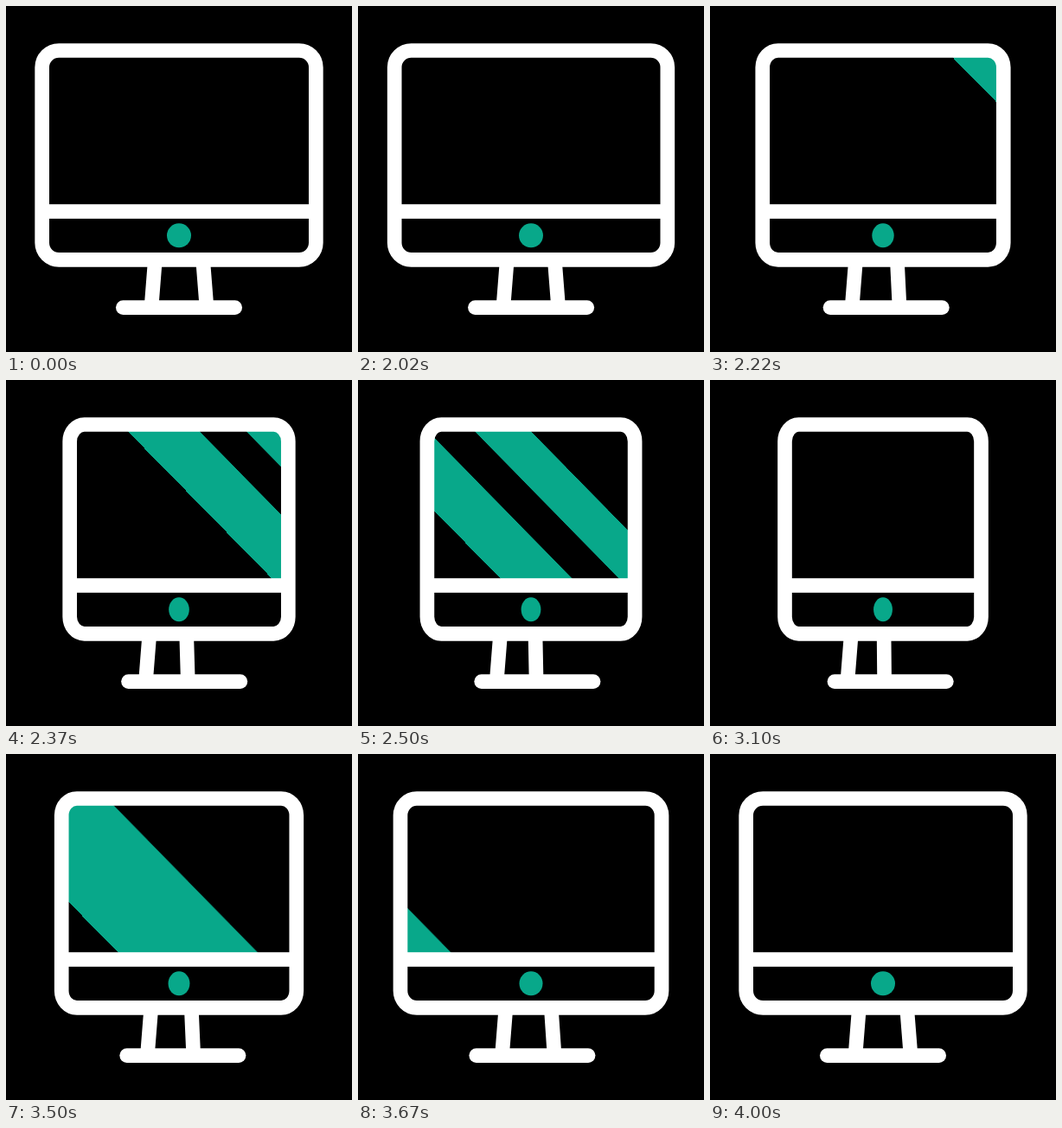
Recreate the animation shown at these times as an HTML page without scripts. Size 400 px wide and 400 px high, loop 4020 ms.

```html
<!DOCTYPE html>
<html lang="en">
<head>
<meta charset="utf-8">
<title>Monitor</title>
<style>
  /* how far each side of the monitor has moved inwards */
  @property --d {
    syntax: "<length>";
    inherits: true;
    initial-value: 0px;
  }
  html, body {
    margin: 0;
    width: 100%;
    height: 100%;
    overflow: hidden;
    background: #000;
  }
  svg {
    display: block;
    width: 100vw;
    height: 100vh;
    animation: squeeze 4020ms infinite;
  }
  .line {
    fill: none;
    stroke: #fff;
    stroke-width: 16.67px;
    stroke-linecap: round;
  }
  .green { fill: #08a88a; }
  .wide {
    x: calc(41.67px + var(--d));
    width: calc(316.66px - 2 * var(--d));
  }
  .case {
    rx: calc(19.5px - .08 * var(--d));
    ry: 19.5px;
  }
  .dot { rx: calc(14px - .068 * var(--d)); }
  .foot { transform: translateX(calc(.193 * var(--d))); }
  .legs {
    stroke-linecap: butt;
    animation: legs 4020ms infinite;
  }
  .pair { animation: pair 4020ms infinite; }
  .band { animation: band 4020ms infinite; }

  @keyframes squeeze {
    0% { --d: 0px; }
    49.75% { --d: 0px; animation-timing-function: cubic-bezier(.24, .1, .15, 1); }
    74.63% { --d: 45.3px; animation-timing-function: cubic-bezier(.6, 0, .4, 1); }
    99.5%, 100% { --d: 0px; }
  }
  @keyframes legs {
    0% { d: path("M172.4 293L168 348.6M227.6 293L232 348.6"); }
    49.75% {
      d: path("M172.4 293L168 348.6M227.6 293L232 348.6");
      animation-timing-function: cubic-bezier(.24, .1, .15, 1);
    }
    74.63% {
      d: path("M163.2 293L158.8 348.6M200.8 293L201.3 348.6");
      animation-timing-function: cubic-bezier(.6, 0, .4, 1);
    }
    99.5%, 100% { d: path("M172.4 293L168 348.6M227.6 293L232 348.6"); }
  }
  @keyframes pair {
    0%, 49.75% {
      transform: translateX(376px);
      animation-timing-function: cubic-bezier(.33, 0, .67, 1);
    }
    74.63%, 100% { transform: translateX(-376px); }
  }
  @keyframes band {
    0%, 50.25% { transform: translateX(440px); }
    74.63% {
      transform: translateX(376px);
      animation-timing-function: cubic-bezier(.33, 0, .67, 1);
    }
    99.5%, 100% { transform: translateX(-376px); }
  }
</style>
</head>
<body>
<svg viewBox="0 0 400 400">
  <clipPath id="screen">
    <rect class="wide case" y="51.5" height="241.8"/>
  </clipPath>

  <g class="green" clip-path="url(#screen)">
    <g class="pair">
      <g transform="translate(0 144) skewX(44.4)">
        <rect x="82" y="-95" width="83" height="188"/>
        <rect x="219" y="-95" width="65" height="188"/>
      </g>
    </g>
    <g class="band">
      <g transform="translate(0 144) skewX(44.4)">
        <rect x="47" y="-95" width="161.5" height="188"/>
      </g>
    </g>
  </g>

  <path class="line legs" d="M172.4 293L168 348.6M227.6 293L232 348.6"/>
  <path class="line foot" d="M135.3 348.6H264.7"/>
  <rect class="line wide case" y="51.5" height="241.8"/>
  <rect class="wide" y="229.2" height="16.67" fill="#fff"/>
  <ellipse class="green dot" cx="200" cy="265.3" ry="14"/>
</svg>
</body>
</html>
```
